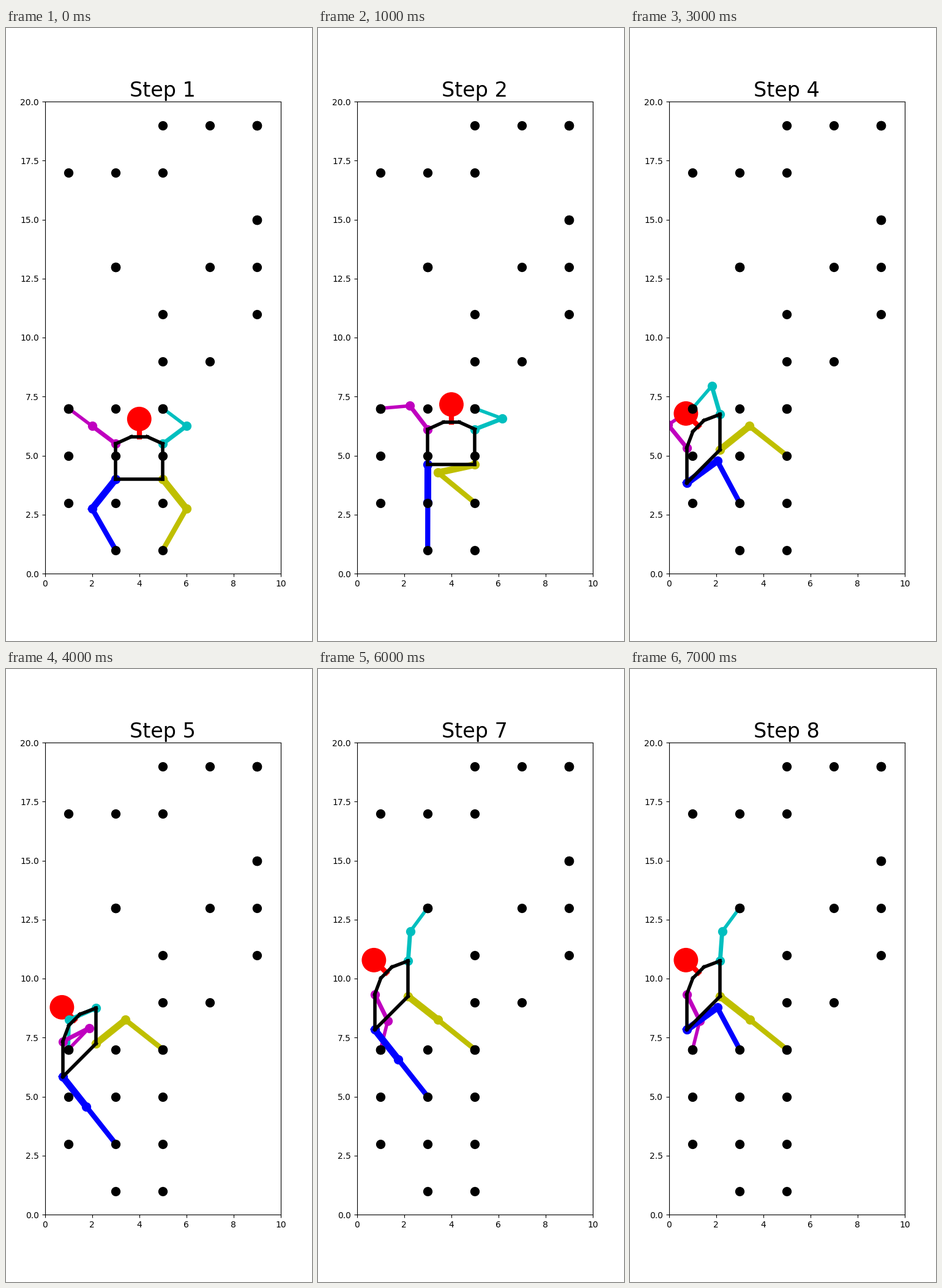
A matplotlib script for the animation above (8000 ms loop, 500x1000 px).

```python
import matplotlib.pyplot as plt
import numpy as np
from matplotlib.animation import FuncAnimation

ARM = (1.25, 1.25)
LEG = (np.hypot(1, 1.25), np.hypot(1, 1.75))
HIP_WIDTH, TORSO = 2.0, 1.5
LEAN = (128.42, 45)     # angle of the stretched leg, tilt of the hips

# Holds sit on every odd row; each entry gives their columns
ROWS = [(3, 5)] + 3 * [(1, 3, 5)] + [(5, 7), (5, 9), (3, 7, 9), (9,),
                                     (1, 3, 5), (5, 7, 9)]
HOLDS = [(x, 2 * i + 1) for i, row in enumerate(ROWS) for x in row]
TARGETS = [(1, 7), (5, 7), (3, 13), (9, 15), (9, 19)]

START = dict(l_hand=(1, 7), r_hand=(5, 7), l_foot=(3, 1), r_foot=(5, 1))
# Each move shifts limbs and may push the body to full stretch from one foot
MOVES = [
    dict(r_foot=(0, 2), push=("l_foot", 89.9, 0)),
    dict(r_foot=(0, 2), r_hand=(-4, 0), push=("l_foot", *LEAN)),
    dict(l_foot=(0, 2)),
    dict(r_foot=(0, 2), push=("l_foot", *LEAN)),
    dict(l_foot=(0, 2), push=("r_foot", 173.3, 63.5)),
    dict(r_hand=(2, 6), push=("l_foot", *LEAN)),
    dict(l_foot=(0, 2)),
]

fig = plt.figure(figsize=(5, 10), dpi=100)
ax = fig.add_subplot()


def direction(degrees):
    angle = np.radians(degrees)
    return np.array([np.cos(angle), np.sin(angle)])


def pose(step):
    """Limb ends, left hip and hip direction after the given number of moves."""
    ends = {name: np.array(p, float) for name, p in START.items()}
    hip, right = np.array([3.0, 4.0]), direction(0)
    for move in MOVES[:step]:
        for name in ends:
            ends[name] = ends[name] + move.get(name, (0, 0))
        if "push" in move:
            foot, leg_angle, tilt = move["push"]
            right = direction(tilt)
            hip = ends[foot] + sum(LEG) * direction(leg_angle)
            if foot == "r_foot":
                hip = hip - HIP_WIDTH * right
    return ends, hip, right


def segment(a, b, color, width):
    ax.plot([a[0], b[0]], [a[1], b[1]], color=color, lw=width)


def dots(points, color):
    xs, ys = zip(*points)
    ax.plot(xs, ys, "o", color=color, ms=10)


def middle_joint(root, tip, lengths, outward):
    """Elbow or knee: bends upward, or outward when the limb is vertical."""
    upper, lower = lengths
    dist = np.hypot(*(tip - root))
    unit = (tip - root) / dist
    normal = np.array([-unit[1], unit[0]])
    if normal @ (outward * 1e-6, 1) < 0:
        normal = -normal
    along = (upper**2 - lower**2 + dist**2) / (2 * dist)
    return root + along * unit + np.sqrt(max(0, upper**2 - along**2)) * normal


def upper_part(root, joint, color, width):
    segment(root, joint, color, width)
    dots([root, joint], color)


def draw(step):
    ax.clear()
    ends, l_hip, right = pose(step)
    up = np.array([-right[1], right[0]])
    r_hip = l_hip + HIP_WIDTH * right
    l_shoulder, r_shoulder = l_hip + (0, TORSO), r_hip + (0, TORSO)
    chest = (l_shoulder + r_shoulder) / 2
    neck, head = chest + 0.3 * up, chest + 1.05 * up

    arms = [(l_shoulder, ends["l_hand"], -1, "m"),
            (r_shoulder, ends["r_hand"], 1, "c")]
    legs = [(l_hip, ends["l_foot"], -1, "b"),
            (r_hip, ends["r_foot"], 1, "y")]

    # The head lies between the forearms and the upper arms
    elbows = [middle_joint(root, tip, ARM, side) for root, tip, side, _ in arms]
    for (_, hand, _, color), elbow in zip(arms, elbows):
        segment(elbow, hand, color, 4)
    segment(neck, head, "r", 6)
    ax.add_patch(plt.Circle(head, 0.5, color="r", zorder=2))
    for (shoulder, _, _, color), elbow in zip(arms, elbows):
        upper_part(shoulder, elbow, color, 5)

    for hip, foot, side, color in legs:
        knee = middle_joint(hip, foot, LEG, side)
        segment(knee, foot, color, 6)
        upper_part(hip, knee, color, 8)

    outline = [l_hip, l_shoulder, neck - right / 3, neck + right / 3,
               r_shoulder, r_hip, l_hip]
    for a, b in zip(outline, outline[1:]):
        segment(a, b, "k", 4)

    dots(HOLDS + 3 * TARGETS, "k")

    ax.set_xlim(0, 10)
    ax.set_ylim(0, 20)
    ax.set_aspect("equal")
    ax.set_title(f"Step {step + 1}", fontsize=24)


anim = FuncAnimation(fig, draw, frames=len(MOVES) + 1, init_func=lambda: None,
                     interval=1000, repeat=True)
plt.show()
```
